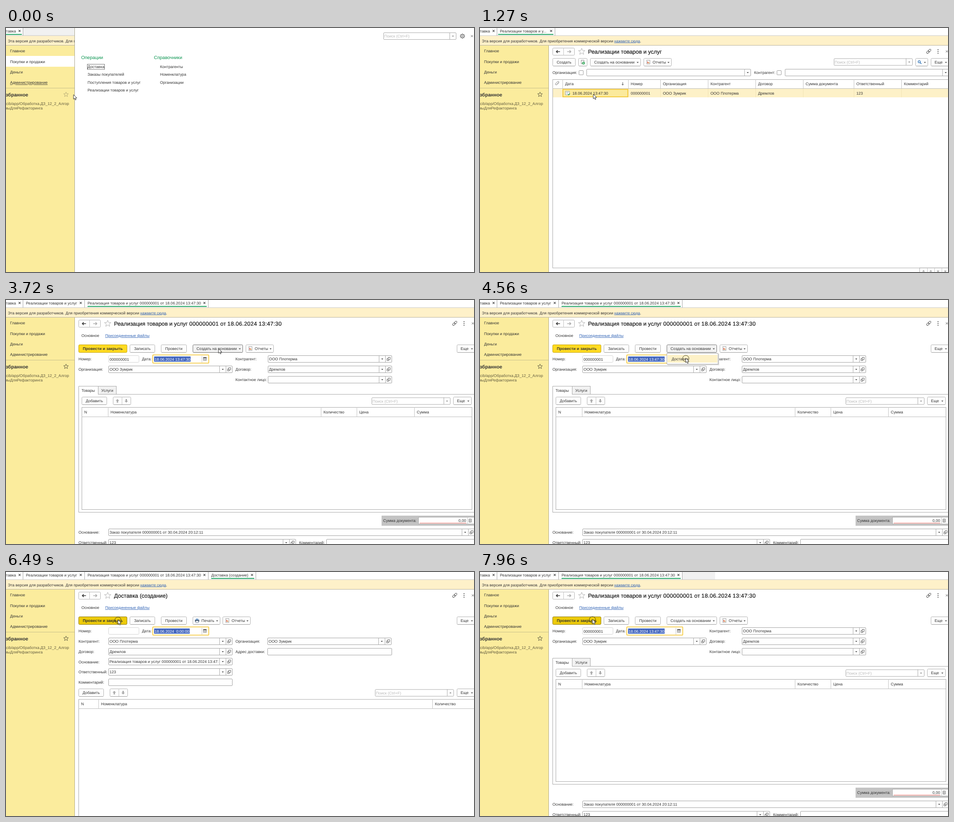
Animation of 1033 by 542 pixels, one loop 8 s. Source, as an HTML page:

```html
<!DOCTYPE html>
<html lang="ru">
<head>
<meta charset="utf-8">
<title>Доставка</title>
<style>
html, body { margin: 0; width: 100%; height: 100%; overflow: hidden; background: #fff; }
svg { display: block; width: 1033px; height: 542px; }
text { font: 8.6px "Liberation Sans", Arial, sans-serif; fill: #333; white-space: pre; text-rendering: geometricPrecision; }
.mid { text-anchor: middle; }
.end { text-anchor: end; }
.bold { font-weight: bold; font-size: 8.8px; }
.hint { fill: #b8b8b8; }
.link { fill: #2f62b5; text-decoration: underline; }
.under { text-decoration: underline; }
.title { font-size: 12.4px; fill: #111; stroke: #111; stroke-width: .2px; }
.digits { letter-spacing: .35px; }
.head { font-size: 10.3px; fill: #0a9450; }
.fav { font-size: 10.7px; font-weight: bold; }
.path { fill: #625c40; }
</style>
</head>
<body>
<svg id="stage" viewBox="0 0 1033 542"></svg>
<script>
const LOOP = 8000;
const SELLER = 'ООО Зумрик', BUYER = 'ООО Плотерма', CONTRACT = 'Дремлов';
const STAMP = '18.06.2024 13:47:30';
const DOC = 'Реализация товаров и услуг 000000001 от ' + STAMP;
const LIST = 'Реализации товаров и услуг';
const EDGE = '#a9a9a9';

// start, scene, pointer, x, y, mark
const steps = [
  [0, 'menu', 'arrow', 149, 148, 'admin'],
  [120, 'menu', 'arrow', 206, 198, ''],
  [240, 'menu', 'arrow', 249, 139, 'sales'],
  [520, 'menu', 'click', 249, 139, 'sales'],
  [640, 'menu', 'arrow', 249, 139, 'sales'],
  [760, 'menu', 'busy', 250, 142, 'sales'],
  [890, 'list', 'busy', 250, 144, 'short'],
  [1130, 'list', 'arrow', 250, 147, 'short'],
  [1790, 'list', 'arrow', 242, 140, 'short'],
  [1920, 'list', 'arrow', 252, 128, 'short'],
  [2050, 'list', 'arrow', 264, 136, 'short'],
  [2180, 'list', 'arrow', 270, 143, 'short'],
  [2460, 'list', 'click', 270, 143, 'short'],
  [2580, 'list', 'busy', 271, 144, ''],
  [2940, 'doc', 'busy', 271, 144, ''],
  [3180, 'doc', 'arrow', 288, 141, ''],
  [3310, 'doc', 'beam', 312, 134, ''],
  [3430, 'doc', 'beam', 331, 131, ''],
  [3580, 'doc', 'arrow', 416, 117, ''],
  [3720, 'doc', 'arrow', 469, 108, 'create'],
  [3870, 'doc', 'click', 469, 108, 'create'],
  [4000, 'doc', 'arrow', 469, 108, 'drop'],
  [4260, 'doc', 'arrow', 463, 120, 'drop'],
  [4400, 'doc', 'arrow', 454, 129, 'drop'],
  [4560, 'doc', 'click', 454, 129, 'drop'],
  [4690, 'doc', 'busy', 454, 131, ''],
  [4820, 'delivery', 'busy', 452, 137, ''],
  [4960, 'delivery', 'beam', 441, 154, ''],
  [5110, 'delivery', 'beam', 417, 172, ''],
  [5230, 'delivery', 'arrow', 387, 164, ''],
  [5360, 'delivery', 'arrow', 351, 142, ''],
  [5500, 'delivery', 'arrow', 322, 120, ''],
  [5670, 'delivery', 'arrow', 303, 111, 'save'],
  [5820, 'delivery', 'arrow', 282, 124, ''],
  [5950, 'delivery', 'arrow', 263, 115, 'post'],
  [6080, 'delivery', 'arrow', 251, 109, 'post'],
  [6210, 'delivery', 'arrow', 247, 106, 'post'],
  [6490, 'delivery', 'click', 247, 106, 'post'],
  [6630, 'delivery', 'busy', 247, 108, 'post'],
  [6900, 'doc', 'busy', 247, 108, 'wide'],
  [7150, 'doc', 'arrow', 247, 106, 'wide post'],
  [7680, 'doc', 'arrow', 248, 105, 'wide post'],
  [7960, 'doc', 'click', 248, 105, 'wide post']
];

const text = (x, y, s, cls = '', size = 0) =>
  `<text x="${x}" y="${y}" class="${cls}"${size ? ` style="font-size:${size}px"` : ''}>${s}</text>`;
const rect = (x, y, w, h, fill, stroke = 'none', r = 0, sw = 1) =>
  `<rect x="${x}" y="${y}" width="${w}" height="${h}" rx="${r}" fill="${fill}" stroke="${stroke}" stroke-width="${sw}"/>`;
const path = (d, stroke = '#444', sw = 1, fill = 'none') =>
  `<path d="${d}" stroke="${stroke}" stroke-width="${sw}" fill="${fill}"/>`;
const hline = (x, y, x2, c = EDGE) => path(`M${x} ${y}H${x2}`, c);
const vline = (x, y, y2, c = EDGE) => path(`M${x} ${y}V${y2}`, c);
const circle = (x, y, r, fill, stroke = 'none', sw = 1) =>
  `<circle cx="${x}" cy="${y}" r="${r}" fill="${fill}" stroke="${stroke}" stroke-width="${sw}"/>`;
const cross = (x, y, r = 2.2, c = '#444', sw = 1.2) =>
  path(`M${x - r} ${y - r}l${2 * r} ${2 * r}m0 ${-2 * r}l${-2 * r} ${2 * r}`, c, sw);
const caret = (x, y) => path(`M${x - 2.2} ${y - 1}h4.4l-2.2 2.4z`, 'none', 0, '#444');

function star(x, y, r, c) {
  const pts = Array.from({ length: 10 }, (_, i) => {
    const a = i * Math.PI / 5 - Math.PI / 2, q = i % 2 ? r * 0.42 : r;
    return (x + q * Math.cos(a)).toFixed(1) + ' ' + (y + q * Math.sin(a)).toFixed(1);
  });
  return path('M' + pts.join('L') + 'Z', c, 0.9);
}

function button(x, y, w, label, { arrow, tx, hot, h = 17 } = {}) {
  return rect(x + .5, y + .5, w - 1, h, hot ? '#f2f2f2' : '#fdfdfd', hot ? '#777' : '#b4b4b4', 2) +
    hline(x + 2, y + h + .5, x + w - 2, hot ? '#666' : '#9a9a9a') +
    (tx ? text(tx, y + 12, label) : text(x + w / 2, y + 12, label, 'mid')) +
    (arrow ? caret(x + w - 7, y + 9.5) : '');
}

const openIcon = (x, y) =>
  rect(x - 3.5, y - .5, 4, 4, 'none', '#555', 0, .9) + rect(x - 1, y - 3.5, 4.5, 4.5, '#fff', '#555', 0, .9);

// icons: 0 plain, 1 list arrow, 2 list arrow and open
function field(x, y, w, value = '', icons = 2) {
  const r = x + w, cy = y + 8;
  let s = rect(x + .5, y + .5, w - 1, 15, '#fff', '#a2a2a2', 1.5) + text(x + 2.5, y + 11, value);
  if (icons) {
    const a = r - (icons === 2 ? 28.5 : 14);
    s += vline(a, y, y + 16) + caret(a + 7, cy);
  }
  if (icons === 2) s += vline(r - 14.5, y, y + 16) + openIcon(r - 7.5, cy);
  return s;
}

const search = (x, y, w = 173, h = 15) =>
  rect(x + .5, y + .5, w, h, '#fff', EDGE, 1.5) + vline(x + w - 13.5, y, y + h) +
  text(x + 2, y + 11.2, 'Поиск (Ctrl+F)', 'hint') + cross(x + w - 6.5, y + 8, 1.6, '#666', .9);

const more = (x, y) => button(x, y, x > 990 ? 50 : 41, 'Еще', { tx: x + 8.5 }) + caret(x + 33.5, y + 9.5);
const report = (x, y) =>
  rect(x, y, 7, 8.5, '#fff', '#888', 0, .8) + rect(x + 1.5, y + 3, 1.6, 4, '#d8442f') + rect(x + 3.8, y + 4.5, 1.6, 2.5, '#d9902c');
const reports = (x, y) => button(x, y, 62, 'Отчеты', { arrow: 1, tx: x + 20 }) + report(x + 7, y + 4.5);
const arrowH = (x, y, d, c) => path(`M${x - 4 * d} ${y}h${8 * d}M${x + d} ${y - 3}l${3 * d} 3l${-3 * d} 3`, c, 1.7);
const arrowV = (x, y, d) => path(`M${x} ${y - 4 * d}l3.8 ${4 * d}h-2.3v${4 * d}h-3v${-4 * d}h-2.3z`, 'none', 0, '#a9a9a9');
const mover = (x, y) => button(x, y, 40, '') + vline(x + 20, y, y + 17, '#c4c4c4') +
  arrowV(x + 10, y + 9, 1) + arrowV(x + 29.5, y + 9, -1);

function tab(label, x, close, sep, from) {
  return text(x, 9.6, label) + cross(close, 6.5) + vline(sep + .5, 0, 17) +
    (from >= 0 ? rect(from, 13.3, close + 5 - from, 1.9, '#16a05a') : '');
}

function tabs(count, short, grayTo) {
  const last = count - 1, end = [37, short ? 165 : 173, 446, 551][last];
  let s = rect(0, 0, 1033, 17, '#fff');
  if (grayTo) s += rect(end, 0, grayTo - end, 17, '#f1f1f1');
  s += hline(0, 17, 1033, '#b5b5b5') + text(22, 9.6, 'тавка', 'end') + cross(30, 6.5) + vline(37.5, 0, 17);
  if (!last) s += rect(0, 13.3, 35, 1.9, '#16a05a');
  if (last > 0) s += tab(short ? 'Реализации товаров и у...' : LIST, 44, short ? 157 : 165, short ? 165 : 173, last === 1 ? 40 : -1);
  if (last > 1) s += tab(DOC, 180, 438, 446, last === 2 ? 180 : -1);
  if (last > 2) s += tab('Доставка (создание)', 453, 543, 551, 453);
  return s;
}

function frame(menu, mark) {
  let s = rect(0, 17.5, 1033, 21, '#fef1c9') + hline(0, 38.5, 1033, '#b9b4a0') +
    text(4, 31.5, 'Эта версия для разработчиков. Для приобретения коммерческой версии <tspan class="link">нажмите сюда</tspan>.', '', 8.55) +
    rect(0, 39, 151, 503, '#fbec9d') + vline(151.5, 39, 542, '#b5ad82');
  if (menu) s += rect(0, 62, 151, 24, '#fff');
  ['Главное', 'Покупки и продажи', 'Деньги', 'Администрирование'].forEach((t, i) => {
    s += text(9, 54.2 + 23.4 * i, t, i === 3 && mark === 'admin' ? 'under' : '', 8.7);
  });
  return s + hline(0, 133.5, 151, '#c9c08a') + text(49, 151.5, 'збранное', 'fav end') +
    star(132.5, 147.8, 5.6, menu ? '#b3a976' : '#55513c') +
    text(139, 170.5, 'cib/app/Обработка.ДЗ_12_2_Алгор', 'path end') +
    text(81, 181.3, 'мыДляРефакторинга', 'path end');
}

function heading(title) {
  const ring = (x, y) => `<rect x="${x - 3.3}" y="${y - 2}" width="6.6" height="4" rx="2" transform="rotate(-45 ${x} ${y})" fill="none" stroke="#555"/>`;
  const label = title.replace(/\d[\d.:]*/g, n => `<tspan class="digits">${n}</tspan>`);
  return rect(160.5, 44.5, 48, 16, '#fdfdfd', '#b4b4b4', 2) + vline(184.5, 44, 61, '#c4c4c4') +
    arrowH(172.5, 52.5, -1, '#333') + arrowH(196.5, 52.5, 1, '#aaa') +
    star(224.5, 52.5, 7.6, '#aaa') + text(238.5, 56.8, label, 'title') +
    ring(988.6, 53.6) + ring(992.4, 50) +
    [48, 52, 56].map(y => circle(1011, y, 1.1, '#444')).join('') + cross(1030.5, 52, 2.3, '#666', 1);
}

function menuScene(mark) {
  let s = rect(152, 0, 881, 542, '#fff') + vline(151.5, 0, 542, '#aaa58c') + search(833, 10, 160) +
    cross(1028.5, 18, 2.2, '#666', 1) + text(166, 68.6, 'Операции', 'head') + text(326.5, 68.6, 'Справочники', 'head') +
    rect(179.5, 80.5, 38, 11.5, 'none', '#666', 0, .9);
  const teeth = Array.from({ length: 8 }, (_, i) =>
    `<path d="M1007.5 12.6v2" stroke="#555" stroke-width="1.8" transform="rotate(${i * 45} 1007.5 18)"/>`).join('');
  s += teeth + circle(1007.5, 18, 3.9, '#fff', '#555') + circle(1007.5, 18, 1.5, '#fff', '#555', .9);
  ['Доставка', 'Заказы покупателей', 'Поступления товаров и услуг', LIST].forEach((t, i) => {
    s += text(180, 89 + 17.4 * i, t, i === 3 && mark === 'sales' ? 'under' : '');
  });
  ['Контрагенты', 'Номенклатура', 'Организации'].forEach((t, i) => { s += text(340, 89 + 17.4 * i, t); });
  return s;
}

function listScene(mark) {
  const cols = [182, 327, 398, 503, 608, 713, 825, 930];
  const heads = ['Дата', 'Номер', 'Организация', 'Контрагент', 'Договор', 'Сумма документа', 'Ответственный', 'Комментарий'];
  const cells = ['', '000000001', SELLER, BUYER, CONTRACT, '', '123', ''];
  let s = heading(LIST) + button(160, 67, 51, 'Создать') + button(217, 67, 20, '') +
    rect(223.5, 71.5, 6, 8, '#fff', '#777', 0, .8) + circle(228.5, 78, 3, '#2aa252') +
    path('M226.9 78h3.2m-1.6 -1.6v3.2', '#fff', .9) +
    button(243, 67, 112, 'Создать на основании', { arrow: 1, tx: 252 }) + reports(361, 67) +
    search(781, 67.5, 173) + button(961, 67, 28, '', { arrow: 1 }) +
    circle(969.5, 75, 2.4, '#fff', '#2f73b8', 1.3) + path('M971.3 76.8l3 3', '#2f73b8', 1.6) + more(995, 67);
  s += text(160, 102.3, 'Организация:') + rect(218.5, 94.5, 9.5, 9.5, '#fff', '#999', 1) + field(235, 91, 363, '', 1) +
    text(605, 102.3, 'Контрагент:') + rect(655.5, 94.5, 9.5, 9.5, '#fff', '#999', 1) + field(673, 91, 362, '', 1);
  s += rect(160.5, 114.5, 880, 418.5, '#fff', EDGE) + rect(161, 135, 872, 19, '#fdf1c7');
  if (!mark) s += rect(183, 115, 74, 19, '#f1f1f1');
  s += hline(160, 134.5, 1033, '#bcbcbc');
  cols.forEach((x, i) => {
    s += vline(x + .5, 114, 134, '#c4c4c4') + vline(x + .5, 135, 154, '#f1e4b6') +
      text(x + 5.7, 127.3, heads[i]) + text(x + 5.7, 147.7, cells[i]);
  });
  s += path('M174 121.5l-4 4q-1.6 1.8 -3 .4t.4 -3l4 -4q1.2 -1 2.2 0t0 2.2l-3.8 3.8', '#666', .9) +
    path('M315 120.5v6.5m-2 -2l2 2l2 -2', '#444', 1) +
    rect(183, 136.3, 143.3, 16.6, '#fbea9c', '#f3c62f', 0, 1.7) +
    rect(188.8, 140.8, 8.5, 7.5, '#fff', '#8a9a9a', 0, .9) +
    path('M190.5 143h5m-5 2h4', '#8a9a9a', .8) + path('M194 147l1.7 1.7l2.8 -3.2', '#26a04c', 1.5) +
    text(204, 147.7, STAMP) + rect(970.5, 533, 70, 16, '#fff', EDGE);
  [979, 995, 1011, 1027].forEach((x, i) => {
    const d = i < 2 ? 1 : -1;
    s += vline(x + 8.5, 533, 542, '#c4c4c4') + path(`M${x - 3} ${540 + d}h6l-3 ${-3 * d}z`, 'none', 0, '#999');
  });
  return s;
}

// top part shared by both document forms
function form(title, number, date, selWidth, mark, pressed) {
  const hot = mark.includes('post');
  return heading(title) + text(166.5, 82, 'Основное') + text(219, 82, 'Присоединенные файлы', 'link', 8.45) +
    rect(160.5, 99.5, 106.5, 17, hot ? (pressed ? '#edcb08' : '#f3d012') : '#ffdb22', hot ? '#8f7800' : '#c5a300', 2) +
    text(213.5, 111, 'Провести и закрыть', 'bold mid') +
    button(273, 99, 56, 'Записать', { hot: mark === 'save' }) + button(342, 99, 57, 'Провести') + more(995, 99) +
    text(160, 134.3, 'Номер:') + rect(226.5, 123.5, 67, 15, '#fff', '#d4d4d4', 2) + text(228.5, 134.5, number) +
    text(300, 134.3, 'Дата:') + rect(324, 122, 123.5, 18.3, '#fff', '#f5c52e', 1, 1.6) +
    rect(327, 125.5, selWidth, 11.5, '#4165be') +
    `<text x="328" y="134.5" style="fill:#fff">${date}</text>` + vline(432.5, 124, 139, '#c4c4c4') +
    rect(436, 128, 6, 6, '#fff', '#555', 0, .9) + rect(435.5, 127, 7, 2.4, '#555') + path('M437 131.5h4', '#777', .9);
}

function grid(x, y, w, h, headH, cols) {
  return rect(x + .5, y + .5, w, h, '#fff', EDGE) + hline(x, y + headH, x + w, '#bcbcbc') +
    cols.map(([cx, label], i) => (i ? vline(cx + .5, y, y + headH, '#c4c4c4') : '') + text(cx + 5.7, y + 13.7, label)).join('');
}

function docScene(mark, pressed) {
  let s = form(DOC, '000000001', STAMP, 80.5, mark, pressed) +
    button(412, 99, 111, 'Создать на основании', { arrow: 1, tx: 420.5, hot: mark === 'create' || mark === 'drop' }) +
    reports(529, 99) + text(160, 157, 'Организация:') + field(226, 146, 274, SELLER);
  [['Контрагент:', BUYER], ['Договор:', CONTRACT], ['Контактное лицо:', '']].forEach(([label, v], i) => {
    s += text(506.5, 134.3 + 22.8 * i, label) + field(578, 123 + Math.round(22.8 * i), 274, v);
  });
  s += rect(160.5, 209.5, 880, 262, '#fff', EDGE) + rect(203.5, 191.5, 40, 18, '#f1f1f1', EDGE) +
    path('M160.5 210V191.5H203.5V210', EDGE, 1, '#fff') + hline(161, 209.5, 203, '#fff') +
    text(181.5, 203.5, 'Товары', 'mid') + text(223.5, 203.5, 'Услуги', 'mid') +
    button(167, 215, 56, 'Добавить') + mover(236, 215) + search(807, 216.5, 173) + more(987, 215) +
    grid(167, 238, 861, 227, 21.5, [[167, 'N'], [225, 'Номенклатура'], [695, 'Количество'], [774, 'Цена'], [901, 'Сумма']]) +
    rect(829, 479, 204, 22.5, '#c3c3c3') + text(832.5, 493.3, 'Сумма документа:') +
    rect(910.5, 482.5, 125, 15, '#fff', EDGE) + hline(913, 495.5, 1016, '#ee6a62') + text(1015.5, 493.3, '0,00', 'end') +
    vline(1018.5, 482, 498, '#c4c4c4') + rect(1022, 486.5, 5, 7, '#fff', '#666', 0, .9) + path('M1022 489h5m-5 2.2h5', '#666', .8) +
    text(160, 519.3, 'Основание:') + field(226, 508, 809, 'Заказ покупателя 000000001 от 30.04.2024 20:12:11') +
    text(160, 541.8, 'Ответственный:') + field(226, 531, 414, '123') +
    text(647, 541.8, 'Комментарий:') + field(707, 531, 340, '', 0);
  if (mark === 'drop') {
    s += rect(414, 120, 114, 25, '#ddd') + rect(412.5, 118.5, 113, 24, '#fff', EDGE) +
      rect(414, 122, 110, 17, '#fdf1c7') + text(423, 133.5, 'Доставка');
  }
  return s;
}

function deliveryScene(mark, pressed) {
  let s = form('Доставка (создание)', '', '18.06.2024  0:00:00', 78.5, mark, pressed) +
    button(412, 99, 61, 'Печать', { arrow: 1, tx: 431.5 }) +
    rect(417, 106, 9.5, 4.5, '#5b6f86') + rect(419, 103.5, 5.5, 2.5, '#7aa7d8') + rect(419, 108.5, 5.5, 4, '#fff', '#5b6f86', 0, .8) +
    reports(478, 99);
  [['Контрагент:', BUYER, 2], ['Договор:', CONTRACT, 2], ['Основание:', DOC.slice(0, -2), 2],
    ['Ответственный:', '123', 2], ['Комментарий:', '', 0]].forEach(([label, v, icons], i) => {
    s += text(160, 157.2 + 22.7 * i, label) + field(226, 146 + Math.round(22.7 * i), 274, v, icons);
  });
  return s + text(506.5, 157.2, 'Организация:') + field(577, 146, 274, SELLER) +
    text(506.5, 179.8, 'Адрес доставки:') + field(577, 169, 275, '', 0) +
    button(160, 259, 56, 'Добавить') + mover(229, 259) + search(814.5, 260.5, 173) + more(995, 259) +
    grid(160, 282.5, 880, 280, 21, [[160, 'N'], [204, 'Номенклатура'], [941, 'Количество']]);
}

function pointer(kind, x, y) {
  if (kind === 'busy') return circle(x, y, 4.6, '#fff', '#2687df', 4) + path(`M${x} ${y - 4.6}a4.6 4.6 0 0 1 4.6 4.6`, '#62b4f5', 2.4);
  if (kind === 'beam') return path(`M${x - 2.5} ${y - 5}h5m-2.5 0v10m-2.5 0h5`, '#222', 1);
  return (kind === 'click' ? circle(x + .2, y + 1, 7, 'none', '#3c3716', .9) : '') +
    path(`M${x} ${y}v10.2l2.4 -2.2l1.7 3.9l1.8 -.8l-1.7 -3.7h3.2z`, '#222', .9, '#fff');
}

const scenes = { menu: menuScene, list: listScene, doc: docScene, delivery: deliveryScene };

function draw([, scene, kind, x, y, mark]) {
  const count = Object.keys(scenes).indexOf(scene) + 1;
  const gray = scene === 'menu' ? 151 : scene === 'list' && !mark ? 257 : mark.includes('wide') ? 519 : 0;
  return tabs(count, mark === 'short', gray) + frame(scene === 'menu', mark) +
    scenes[scene](mark, kind === 'click') + pointer(kind, x, y);
}

const stage = document.getElementById('stage');
const start = performance.now();
let shown = null;
function tick() {
  const t = (performance.now() - start) % LOOP;
  const step = steps.findLast(s => s[0] <= t) || steps[0];
  if (step !== shown) {
    stage.innerHTML = draw(step);
    shown = step;
  }
  requestAnimationFrame(tick);
}
tick();
</script>
</body>
</html>
```
